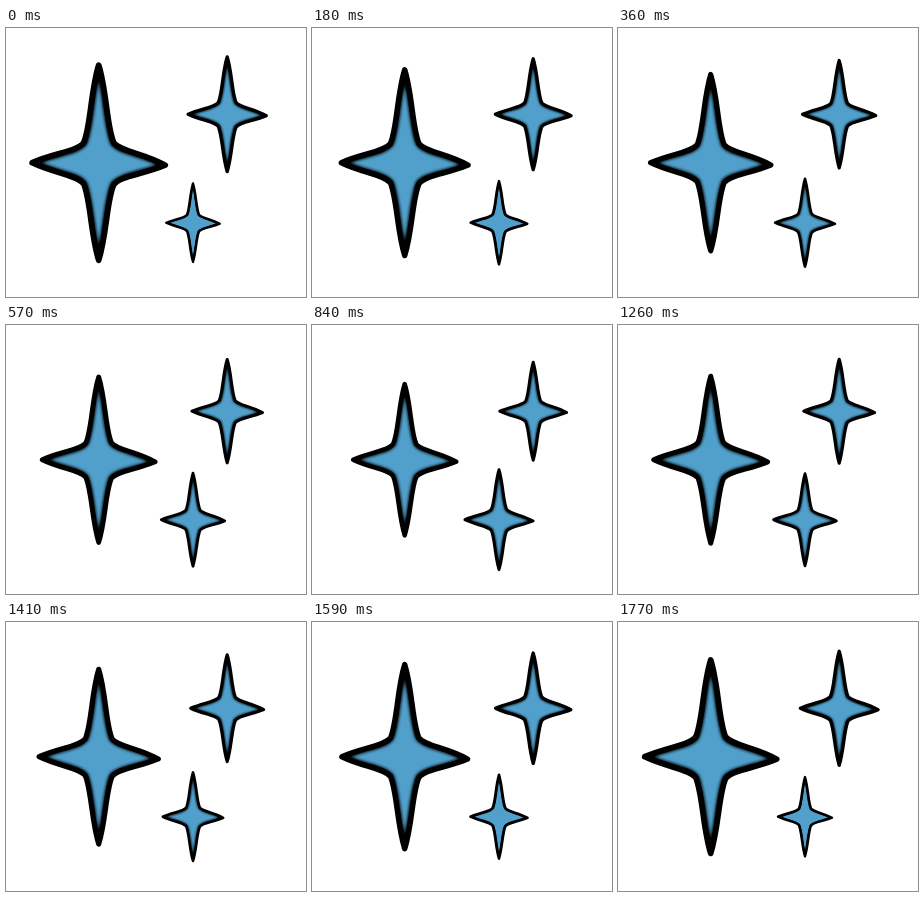
Recreate the animation shown at these times as an HTML page. Size 300x269 px, loop 1800 ms.

```html
<!DOCTYPE html>
<html lang="en">
<head>
<meta charset="utf-8">
<title>Twinkling stars</title>
<style>
  html, body { margin: 0; width: 100%; height: 100%; overflow: hidden; background: #fff; }
  svg { display: block; width: 100vw; height: 100vh; }
</style>
</head>
<body>
<svg viewBox="0 0 300 269">
  <defs>
    <path id="outline" d="M0-97.5C8-72 8-36 15-20C22-11 44-10 66.5 2.5
      C44 12 22 13 15 22C8 38 8 72 0 97.5
      C-8 72-8 38-15 21C-22 12-44 11-66.5 0
      C-44-10-22-11-15-20C-8-36-8-72 0-97.5Z"/>
    <clipPath id="inside"><use href="#outline"/></clipPath>
    <filter id="soft" filterUnits="userSpaceOnUse" x="-85" y="-115" width="170" height="230"
      color-interpolation-filters="sRGB">
      <feGaussianBlur stdDeviation="1.8"/>
    </filter>
    <g id="star" stroke="#000" stroke-linejoin="round">
      <use href="#outline" fill="#50a0cb" stroke="none"/>
      <g clip-path="url(#inside)">
        <use href="#outline" fill="none" stroke-width="7.5" filter="url(#soft)"/>
      </g>
      <use href="#outline" fill="none" stroke-width="5.8"/>
    </g>
  </defs>
  <use class="twinkle" href="#star"/>
  <use class="twinkle" href="#star"/>
  <use class="twinkle" href="#star"/>
</svg>
<script>
  const LOOP = 1800;
  // Centre, resting scale and scale at mid-loop
  const stars = [
    { x: 92.7, y: 134.7, from: 1, to: 0.76 },
    { x: 221.2, y: 86.2, from: 0.587, to: 0.497 },
    { x: 187, y: 194.7, from: 0.403, to: 0.52 }
  ];
  const nodes = document.querySelectorAll('.twinkle');

  function draw(now) {
    const phase = (now % LOOP) / LOOP;
    const swing = 1 - Math.abs(1 - 2 * phase);
    stars.forEach(({ x, y, from, to }, i) => {
      const scale = from + (to - from) * swing;
      nodes[i].setAttribute('transform', `translate(${x} ${y}) scale(${scale})`);
    });
  }

  let start;
  function tick(now) {
    start ??= now;
    draw(now - start);
    requestAnimationFrame(tick);
  }
  draw(0);
  requestAnimationFrame(tick);
</script>
</body>
</html>
```
